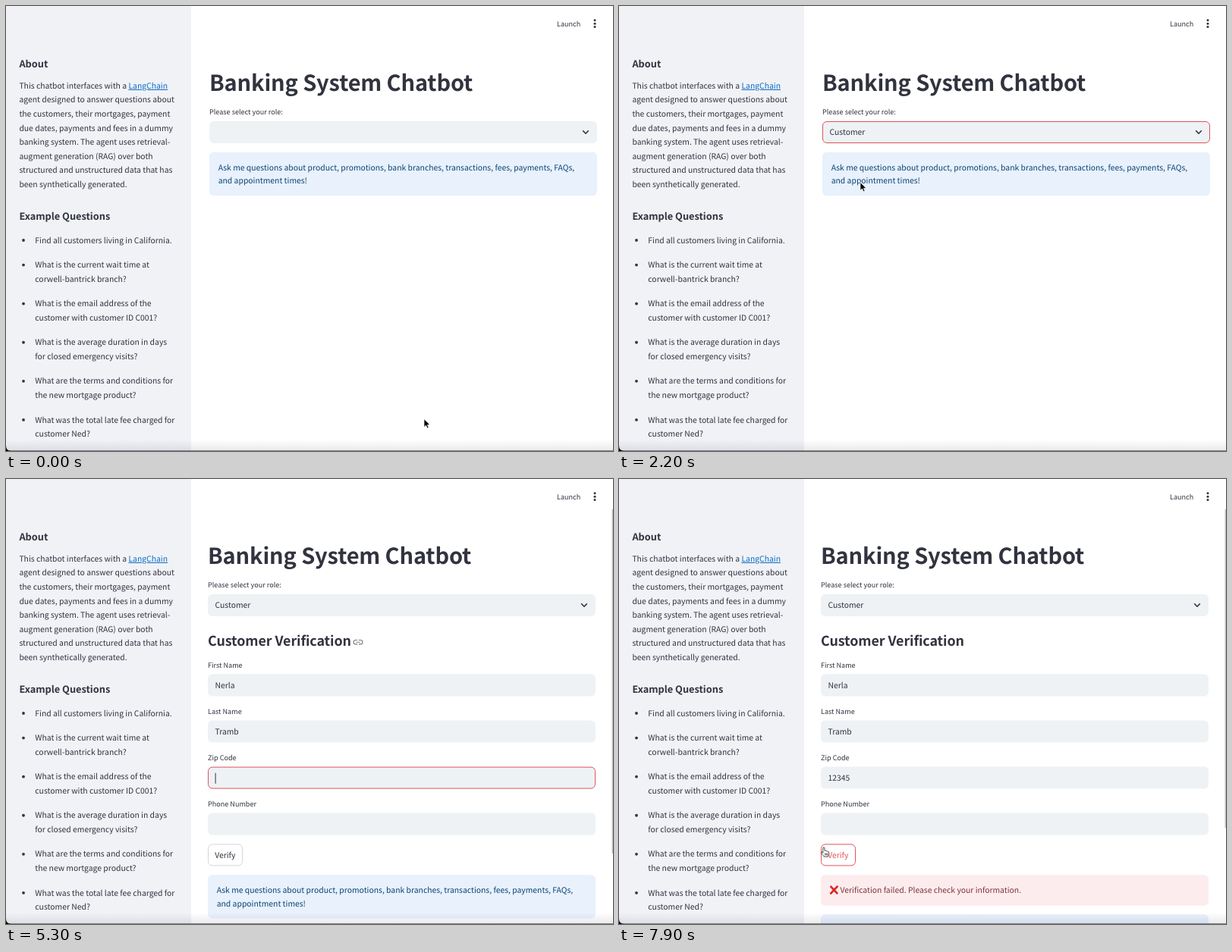
An HTML page that plays this animation: 800x587 px, repeating every 8000 ms.

```html
<!DOCTYPE html>
<html lang="en">
<head>
<meta charset="utf-8">
<title>Banking System Chatbot</title>
<style>
  html, body { margin: 0; width: 100%; height: 100%; overflow: hidden; background: #fff; }
  svg { display: block; width: 100%; height: 100%; }
  text { font-family: "Noto Sans CJK JP", "Noto Sans CJK SC", "Noto Sans", sans-serif; text-rendering: geometricPrecision; white-space: pre; }
  .tip { font-family: Inter, Roboto, sans-serif; }
  .menu { filter: drop-shadow(0 2px 5px rgba(0, 0, 0, .16)); }
</style>
</head>
<body>
<svg id="stage" viewBox="0 0 800 587"></svg>
<script>
const LOOP = 8000, STEP = 100;
const INK = '#31333f', BOX = '#eef2f5', RED = '#e0535a', LINK = '#0d6cc4', NAVY = '#0c4474';
const FAMILY = '"Noto Sans CJK JP","Noto Sans CJK SC","Noto Sans",sans-serif';
const stage = document.getElementById('stage');
const ctx = document.createElement('canvas').getContext('2d');

// Sizes refer to a face with these digit widths; convert them to the installed face.
const digitWidth = { 400: .497, 600: .52, 700: .536 };
const sizeRatio = {};
for (const weight in digitWidth) {
  ctx.font = `${weight > 400 ? 700 : 400} 100px ${FAMILY}`;
  sizeRatio[weight] = digitWidth[weight] * 100 / ctx.measureText('0').width;
}
const BODY = 11.61, SMALL = 10.16;

function text(x, y, str, { size = BODY, weight = 400, fill = INK, extra = '' } = {}) {
  const px = (size * sizeRatio[weight]).toFixed(3);
  return `<text x="${x}" y="${y}" font-size="${px}" font-weight="${weight > 400 ? 700 : 400}" fill="${fill}" ${extra}>${str}</text>`;
}
function textWidth(str) {
  ctx.font = `400 100px ${FAMILY}`;
  return ctx.measureText(str).width * BODY * sizeRatio[400] / 100;
}
const rect = (x, y, w, h, fill, r = 0, stroke = 'none') =>
  `<rect x="${x}" y="${y}" width="${w}" height="${h}" rx="${r}" fill="${fill}" stroke="${stroke}"/>`;
const path = (d, stroke, width = 1, fill = 'none') =>
  `<path d="${d}" fill="${fill}" stroke="${stroke}" stroke-width="${width}" stroke-linecap="round" stroke-linejoin="round"/>`;
const at = (x, y, content) => `<g transform="translate(${x} ${y})">${content}</g>`;
const caret = (x, y) => rect(x, y, 1, 14, INK);

// Input box, outlined in red while focused.
const inputBox = (x, y, focused) => focused
  ? rect(x + .5, y + .5, 510, 28, BOX, 5.5, RED)
  : rect(x, y, 511, 29, BOX, 5.8);

const about = [
  'This chatbot interfaces with a <tspan fill="' + LINK + '" text-decoration="underline">LangChain</tspan>',
  'agent designed to answer questions about', 'the customers, their mortgages, payment',
  'due dates, payments and fees in a dummy', 'banking system. The agent uses retrieval-',
  'augment generation (RAG) over both', 'structured and unstructured data that has',
  'been synthetically generated.'
];
const examples = [
  ['Find all customers living in California.'],
  ['What is the current wait time at', 'corwell-bantrick branch?'],
  ['What is the email address of the', 'customer with customer ID C001?'],
  ['What is the average duration in days', 'for closed emergency visits?'],
  ['What are the terms and conditions for', 'the new mortgage product?'],
  ['What was the total late fee charged for', 'customer Ned?']
];

function sidebar() {
  const heading = { size: 14.51, weight: 600 };
  let out = rect(0, 0, 244, 587, '#f0f2f6') + text(17.4, 80.8, 'About', heading);
  about.forEach((line, i) => out += text(17.4, 108.9 + i * 18.58, line));
  out += text(17.4, 282, 'Example Questions', heading);
  let y = 312.6;
  for (const lines of examples) {
    out += `<circle cx="23" cy="${y - 3.6}" r="1.9" fill="${INK}"/>`;
    for (const line of lines) {
      out += text(38.3, y, line);
      y += 18.58;
    }
    y += 13.95;
  }
  return out;
}

function header() {
  return text(726, 27, 'Launch', { size: SMALL })
    + [18.8, 23.2, 27.6].map(y => `<circle cx="776" cy="${y}" r="1.5" fill="${INK}"/>`).join('');
}

function windowEdge() {
  return `<defs><linearGradient id="shade" x2="0" y2="1"><stop stop-color="#303050" stop-opacity="0"/>
    <stop offset="1" stop-color="#303050" stop-opacity=".1"/></linearGradient></defs>`
    + rect(0, 572, 800, 14.5, 'url(#shade)') + rect(0, 586.2, 800, .8, '#66666b')
    + '<path d="M0 580Q0 587 7 587H0Z" fill="#000"/>';
}

function info(x, y) {
  return rect(x, y, 511, 57.5, '#e8f1fc', 5.8)
    + text(x + 11.7, y + 24, 'Ask me questions about product, promotions, bank branches, transactions, fees, payments, FAQs,', { fill: NAVY })
    + text(x + 11.7, y + 41.5, 'and appointment times!', { fill: NAVY });
}

function roleSelect(x, value, focused) {
  return text(x, 111.8, 'Banking System Chatbot', { size: 31.93, weight: 700, extra: 'letter-spacing="-.005em"' })
    + text(x, 143.4, 'Please select your role:', { size: SMALL })
    + inputBox(x, 152, focused) + text(x + 9.5, 170.4, value)
    + path(`M${x + 492.6} 164.8l3.4 3.4 3.4-3.4`, INK, 1.6);
}

function roleMenu(t) {
  const row = t < 1500 ? 0 : 1;
  return `<path class="menu" d="M268 181H779V262Q779 268 773 268H274Q268 268 268 262Z" fill="#fff"/>`
    + rect(268, 181 + row * 29, 511, 29, BOX)
    + text(279.6, 228.2, 'Customer') + text(279.6, 257.2, 'Banker');
}

function linkIcon(focused) {
  const ring = focused ? '<rect x="-6.6" y="-6.4" width="13.2" height="13" rx="2" fill="#f3f7fc" stroke="' + LINK + '" stroke-width="1.6"/>' : '';
  return at(464, 215.2, ring + path('M-1.3-2.7H-3.2a2.7 2.7 0 0 0 0 5.4H-1.3M1.3-2.7H3.2a2.7 2.7 0 0 1 0 5.4H1.3M-2.2 0H2.2', '#777983', 1.1));
}

// Each field: its label, final value and the time of every keystroke.
const fields = [
  { label: 'First Name', value: 'Nerla', keys: [2800, 2900, 3100, 3200, 3300], from: 2700, to: 3400 },
  { label: 'Last Name', value: 'Tramb', keys: [4000, 4100, 4300, 4600, 4600], from: 3400, to: 5300 },
  { label: 'Zip Code', value: '12345', keys: [6000, 6100, 6200, 6300, 6800], from: 5300, to: 7500,
    more: ['12340', '10234', '11234'] },
  { label: 'Phone Number', value: '', keys: [], from: LOOP, to: LOOP }
];
const caretOff = [[1700, 2000], [3600, 3900], [4900, 5100], [5500, 5800], [6600, 6800], [7100, 7500]];
const within = (t, [a, b]) => t >= a && t < b;
const caretShown = t => !caretOff.some(span => within(t, span));

function suggestions(y, items) {
  return path(`M346.5 ${y + 34.5}L353.5 ${y + 28.5}L360.5 ${y + 34.5}Z`, '#1e1e1e', .6, '#1e1e1e')
    + rect(339, y + 34.4, 113, 8 + items.length * 24, '#1e1e1e', 4)
    + items.map((item, i) => `<text class="tip" x="347.7" y="${y + 53.8 + i * 24}" font-size="9.4" font-weight="600" fill="#fff">${item}</text>`).join('');
}

function form(t) {
  let out = text(266, 220.4, 'Customer Verification', { size: 20.32, weight: 600, extra: 'letter-spacing="-.005em"' });
  let popup = '';
  if (t < 7100) out += linkIcon(within(t, [2500, 2700]));
  fields.forEach((field, i) => {
    const y = 257.6 + i * 61;
    const count = field.keys.filter(key => t >= key).length;
    const typed = field.value.slice(0, count);
    const focused = within(t, [field.from, field.to]);
    out += text(266, y - 8.5, field.label, { size: SMALL }) + inputBox(266, y, focused)
      + text(275.5, y + 18.3, typed);
    if (!focused) return;
    if (caretShown(t)) out += caret(275.6 + textWidth(typed), y + 8.2);
    if (count) out += text(771, y + 25.2, 'Press Enter to apply', { size: 8.71, fill: '#84858c', extra: 'text-anchor="end"' });
    if (count && count < field.value.length)
      popup = suggestions(y, [field.value, ...(count === 1 && field.more || [])]);
  });
  const hover = t >= 7500, failed = t >= 7700;
  out += rect(266.5, 481.9, 45, 28, '#fff', 5.5, hover ? RED : '#d6d6d9')
    + text(275.2, 499.8, 'Verify', { fill: hover ? RED : INK });
  if (failed) {
    out += rect(266, 522.3, 511, 40.5, '#fdeced', 5.8)
      + path('M279.4 537.8l8 8.6M287.6 537.6l-8.4 9', '#dc2525', 2.7)
      + text(291.5, 546.3, 'Verification failed. Please check your information.', { fill: '#7d353b' });
  }
  return out + info(266, failed ? 574.3 : 522.3)
    + rect(798.6, 40, 1.4, failed ? 420 : 454, '#bdbdc1') + popup;
}

const pointerPath = [
  [0, 551, 545], [200, 420, 520], [400, 130, 440], [600, 28, 320], [900, 150, 385], [1000, 235, 375],
  [1100, 340, 185], [1200, 352, 166], [1300, 352, 166], [1400, 342, 200], [1500, 332, 234], [1600, 332, 234],
  [2000, 318, 238], [2500, 318, 225], [7100, 318, 225], [7300, 214, 400], [7500, 262, 484], [7700, 270, 486], [8000, 270, 486]
];
const pointerKinds = [[0, 'arrow'], [1100, 'beam'], [1400, 'hand'], [2200, 'arrow'], [2500, 'none'], [7100, 'arrow'], [7500, 'hand']];
const pointers = {
  none: '',
  arrow: path('M0 0V10.5L2.5 8.2L4.2 12L6 11.2L4.4 7.6H7.7Z', '#fff', .7, '#000'),
  beam: path('M-2-6Q0-6 0-4.5Q0-6 2-6M0-4.5V4.5M-2 6Q0 6 0 4.5Q0 6 2 6M-1.2 .8H1.2', '#222', 1),
  hand: path('M-1.2 7V1Q-1.2-.2-.1-.2Q1 0 1 1V4.3Q2.7 3.5 3.1 4.9Q4.6 4.2 5 5.6Q6.7 5.2 6.7 6.8V8.5Q6.6 10 5.6 11V12.2H.3Q-.4 10.7-2.6 8.6Q-4.4 6.5-3.2 5.9Q-2.4 5.5-1.2 7ZM1.7 8V10M3.2 8V10M4.7 8V10', '#222', .8, '#fff')
};

function pointer(t) {
  const i = pointerPath.findIndex(p => p[0] > t);
  const [t0, x0, y0] = pointerPath[i - 1], [t1, x1, y1] = pointerPath[i];
  const k = (t - t0) / (t1 - t0);
  const kind = pointerKinds.filter(p => t >= p[0]).pop()[1];
  return at(x0 + (x1 - x0) * k, y0 + (y1 - y0) * k, pointers[kind]);
}

function page(t) {
  if (t >= 2300) return roleSelect(266, 'Customer', t < 2500) + form(t);
  const open = within(t, [1300, 2200]);
  return roleSelect(268, t >= 2200 ? 'Customer' : '', t >= 1300) + info(268, 192.7)
    + (open ? roleMenu(t) : '') + (open && caretShown(t) ? caret(279, 159.3) : '');
}

const fixed = sidebar() + header(), edge = windowEdge();
let shown = -1;
function tick() {
  const t = Math.floor(performance.now() % LOOP / STEP) * STEP;
  if (t !== shown) {
    shown = t;
    stage.innerHTML = rect(0, 0, 800, 587, '#fff') + fixed + page(t) + edge + pointer(t);
  }
  requestAnimationFrame(tick);
}
tick();
</script>
</body>
</html>
```
